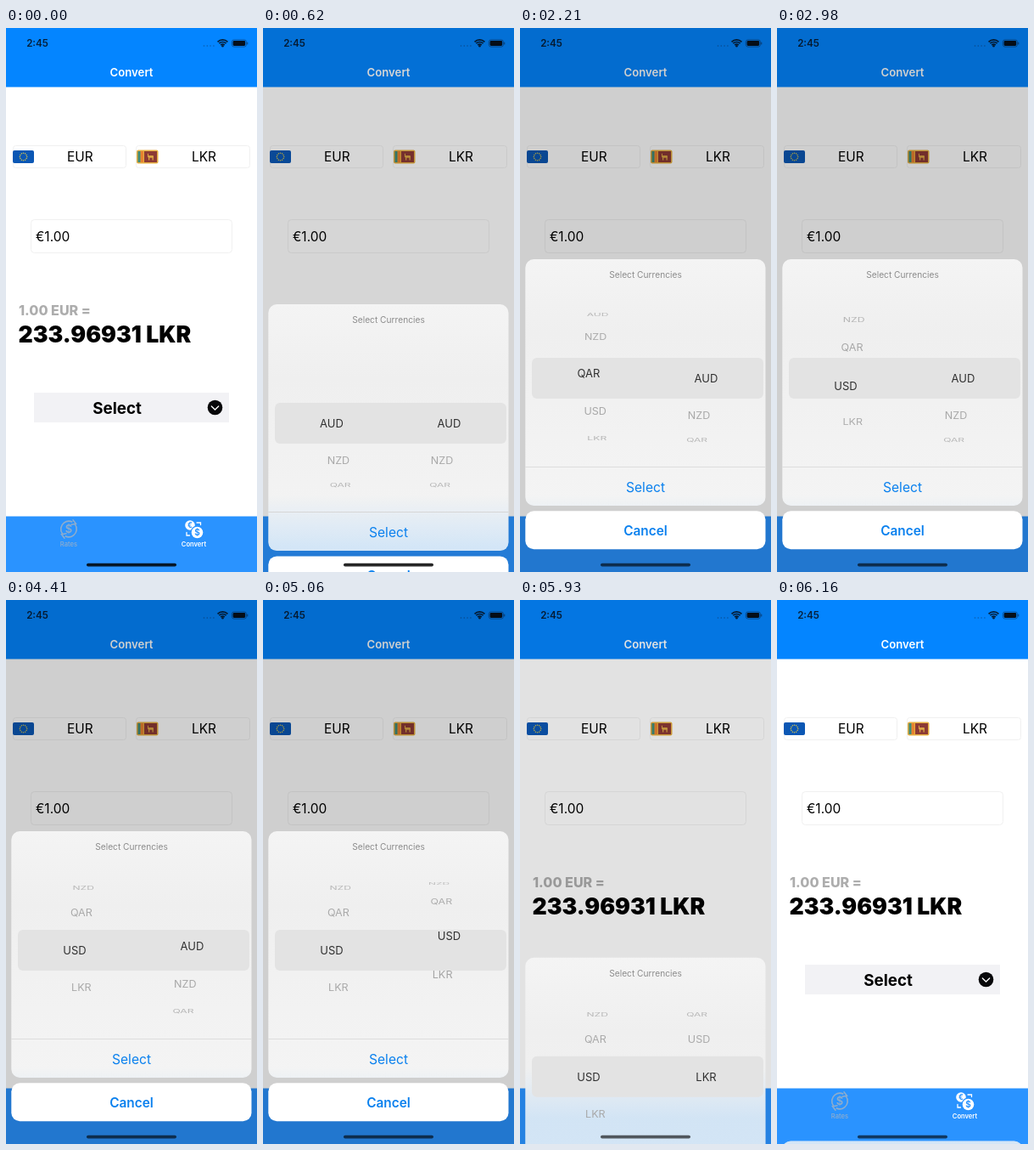
An HTML page with a canvas that plays this animation: 296 px wide and 640 px high, repeating every 8000 ms.

```html
<!DOCTYPE html>
<html lang="en">
<head>
<meta charset="utf-8">
<title>Currency converter</title>
<style>
html, body { margin: 0; width: 100%; height: 100%; overflow: hidden; background: #fff; }
canvas { display: block; width: 296px; height: 640px; }
</style>
</head>
<body>
<canvas id="stage" width="296" height="640"></canvas>
<script>
const ctx = document.getElementById('stage').getContext('2d');
const LOOP = 8000, W = 296, H = 640;
const BLUE = '#0485ff', TAB_BLUE = '#2a93ff', LINK = '#0a80ee', MUTED = '#8fadcc';
const CODES = ['AUD', 'NZD', 'QAR', 'USD', 'LKR'];
const SHEET_TRAVEL = 368, WHEEL_Y = 412, WHEEL_R = 79, ROW_ANGLE = 0.59;

// Bursts of motion: start, end, number of steps
const BURSTS = [[500, 850, 4], [1660, 3440, 17], [4410, 5620, 12], [5820, 6160, 4]];

function snap(t) {
  const burst = BURSTS.filter(b => b[0] <= t).pop();
  if (!burst) return 0;
  const [start, end, steps] = burst, dt = (end - start) / (steps - 1);
  return start + Math.min(steps - 1, Math.floor((t - start) / dt + 0.06)) * dt;
}

function sheetOffset(t) {
  if (t < 500) return SHEET_TRAVEL;
  if (t < 840) return SHEET_TRAVEL * Math.exp(-(t - 456) / 83);
  if (t < 5820) return 0;
  const u = Math.min(1, (t - 5820) / 340) ** 0.75;
  return 364.4 * u * u * (3 - 2 * u);
}

function leftRow(t) {
  if (t < 1660) return 0;
  return t < 3435 ? 3 * (1 - Math.exp(-(t - 1655) / 455)) : 3;
}

function rightRow(t) {
  const u = Math.max(0, Math.min(1, (t - 4400) / 1220));
  return 4 * (1 - (1 - u) ** 3);
}

function rect(x, y, w, h, color, r = 0) {
  ctx.fillStyle = color;
  ctx.beginPath();
  ctx.roundRect(x, y, w, h, r);
  ctx.fill();
}

function disc(x, y, r, color) {
  ctx.fillStyle = color;
  ctx.beginPath();
  ctx.arc(x, y, r, 0, 7);
  ctx.fill();
}

function outline(x, y, w, h, r, color = '#f0f0f0', width = 1) {
  ctx.strokeStyle = color;
  ctx.lineWidth = width;
  ctx.beginPath();
  ctx.roundRect(x, y, w, h, r);
  ctx.stroke();
}

function arc(x, y, r, from, to, color, width) {
  ctx.strokeStyle = color;
  ctx.lineWidth = width;
  ctx.beginPath();
  ctx.arc(x, y, r, from, to);
  ctx.stroke();
}

function line(points, color, width) {
  ctx.strokeStyle = color;
  ctx.lineWidth = width;
  ctx.lineCap = 'round';
  ctx.beginPath();
  points.forEach(([x, y]) => ctx.lineTo(x, y));
  ctx.stroke();
  ctx.lineCap = 'butt';
}

function text(str, x, y, size, color, weight = 400, align = 'center') {
  ctx.font = `${weight} ${size}px Inter, sans-serif`;
  ctx.textAlign = align;
  ctx.textBaseline = 'alphabetic';
  ctx.fillStyle = color;
  ctx.fillText(str, x, y + size * 0.364);
}

function statusBar() {
  text('2:45', 37, 18, 11.6, '#06203c', 600);
  for (let i = 0; i < 4; i++) disc(233.5 + i * 3.8, 21, 0.8, '#0b5cad');
  for (const r of [3.2, 5.8, 8.4]) arc(255.5, 22.3, r, -2.36, -0.78, '#06203c', 1.7);
  disc(255.5, 21.3, 1.3, '#06203c');
  outline(266.4, 13.9, 17, 8.2, 2.4, '#0a4a8c', 0.8);
  rect(267.6, 15.1, 14.6, 5.8, '#06101c', 1.4);
  rect(284.2, 16.6, 1.1, 2.8, '#0a4a8c', 0.5);
}

function flags() {
  rect(8, 144, 25, 15, '#0b57b4', 2);
  for (let i = 0; i < 12; i++) {
    const a = i * Math.PI / 6;
    disc(20.5 + 4.2 * Math.cos(a), 151.5 + 4.2 * Math.sin(a), 0.75, '#d9c34a');
  }
  rect(154, 143.5, 25.5, 16, '#e5ad3f', 2);
  rect(155.5, 145, 3.2, 13, '#3f8a78');
  rect(158.7, 145, 3.2, 13, '#e8812f');
  rect(163, 145, 15, 13, '#8c3a35');
  rect(167.5, 150, 6.5, 2.8, '#dba544', 1);
  rect(168, 152, 1.3, 3.5, '#dba544');
  rect(172.5, 152, 1.3, 3.5, '#dba544');
  rect(167, 147.8, 1, 4, '#dba544');
}

function tabBar() {
  rect(0, 574.6, W, 66, TAB_BLUE);
  arc(74, 589.5, 9.3, 2.5, 5.2, MUTED, 1.6);
  arc(74, 589.5, 9.3, -0.65, 2.05, MUTED, 1.6);
  line([[79, 578.8], [82.5, 583.3], [77, 584.2]], MUTED, 1.5);
  line([[69, 600.2], [65.5, 595.7], [71, 594.8]], MUTED, 1.5);
  text('$', 74, 589.7, 13, MUTED, 600);
  text('Rates', 74, 607.3, 7.6, MUTED, 500);

  disc(217, 585, 5.8, '#fff');
  text('€', 217, 585, 8.5, TAB_BLUE, 700);
  disc(225.5, 593.5, 8, TAB_BLUE);
  disc(225.5, 593.5, 6.8, '#fff');
  text('$', 225.5, 593.5, 10, TAB_BLUE, 700);
  line([[225, 582], [229.5, 582], [229.5, 584.5]], '#fff', 1.3);
  line([[213, 593.5], [213, 597], [216.5, 597]], '#fff', 1.3);
  text('Convert', 221.5, 607.3, 7.6, '#fff', 600);
}

function page() {
  rect(0, 0, W, H, '#fff');
  rect(0, 0, W, 69.4, BLUE);
  statusBar();
  text('Convert', 148, 52.3, 13.2, '#fff', 600);

  outline(8.5, 138.5, 133, 26, 3);
  outline(153.5, 138.5, 134, 26, 3);
  flags();
  text('EUR', 87.3, 151.6, 15.4, '#000');
  text('LKR', 233.5, 151.6, 15.4, '#000');

  outline(29.5, 225.5, 237, 39, 4);
  text('€1.00', 35, 245.4, 15.5, '#000', 400, 'left');
  text('1.00 EUR =', 15, 332, 16.1, '#adadad', 800, 'left');
  text('233.96931 LKR', 14.5, 360, 26.6, '#000', 900, 'left');

  rect(33, 429, 230, 35, '#f2f2f5');
  text('Select', 131, 447, 18.8, '#000', 700);
  disc(246.5, 446.5, 8.8, '#08080a');
  line([[242.3, 445], [246.5, 449], [250.7, 445]], '#fff', 1.3);
  tabBar();
}

function wheelRows(x, pos, inBand) {
  CODES.forEach((code, i) => {
    const angle = (i - pos) * ROW_ANGLE;
    if (Math.abs(angle) > 1.4) return;
    const depth = Math.cos(angle);
    ctx.save();
    const px = inBand ? x : 148 + (x - 148) * (0.82 + 0.075 * depth);
    ctx.translate(px, WHEEL_Y + WHEEL_R * Math.sin(angle));
    if (!inBand) ctx.scale(0.9 + 0.08 * depth, 0.1 + 0.9 * depth);
    const gray = 195 - 32 * depth;
    text(code, 0, 0, 13, inBand ? '#303030' : `rgb(${gray},${gray},${gray})`);
    ctx.restore();
  });
}

function wheels(t, inBand) {
  ctx.save();
  ctx.beginPath();
  if (inBand) ctx.rect(14, 388, 273, 48);
  else {
    ctx.rect(14, 310, 273, 78);
    ctx.rect(14, 436, 273, 78);
  }
  ctx.clip();
  wheelRows(81, leftRow(t), inBand);
  wheelRows(219.5, rightRow(t), inBand);
  ctx.restore();
}

function sheet(t, offset) {
  ctx.save();
  ctx.translate(0, offset);
  const panel = ctx.createLinearGradient(0, 272, 0, 562);
  panel.addColorStop(0, '#f4f4f4');
  panel.addColorStop(0.3, '#efefef');
  panel.addColorStop(1, '#f4f4f4');
  rect(6.3, 272, 283.2, 290, panel, 10);

  // The tab bar shines through the panel while it slides
  const tint = ctx.createLinearGradient(0, 550 - offset, 0, 610 - offset);
  tint.addColorStop(0, 'rgba(120,190,255,0)');
  tint.addColorStop(1, 'rgba(120,190,255,.26)');
  rect(6.3, 272, 283.2, 290, tint, 10);

  text('Select Currencies', 148, 290, 10.2, '#8c8c8c');
  rect(14, 388, 273, 48, '#e3e3e3', 6);
  wheels(t, false);
  wheels(t, true);
  rect(6.3, 516, 283.2, 0.8, '#d6d6d6');
  text('Select', 148, 540, 15.6, LINK);
  rect(6.3, 568.3, 283.2, 44.9, '#fff', 10);
  text('Cancel', 148, 591, 15.4, LINK, 600);
  ctx.restore();
}

function draw(now) {
  const t = snap(now % LOOP), offset = sheetOffset(t);
  page();
  if (offset < SHEET_TRAVEL) {
    rect(0, 0, W, H, `rgba(0,0,0,${0.19 * (1 - offset / SHEET_TRAVEL)})`);
    sheet(t, offset);
  }
  rect(95, 629.7, 106, 3.8, `rgba(0,0,0,${t < 850 ? 0.85 : 0.62})`, 2);
  requestAnimationFrame(draw);
}
requestAnimationFrame(draw);
</script>
</body>
</html>
```
